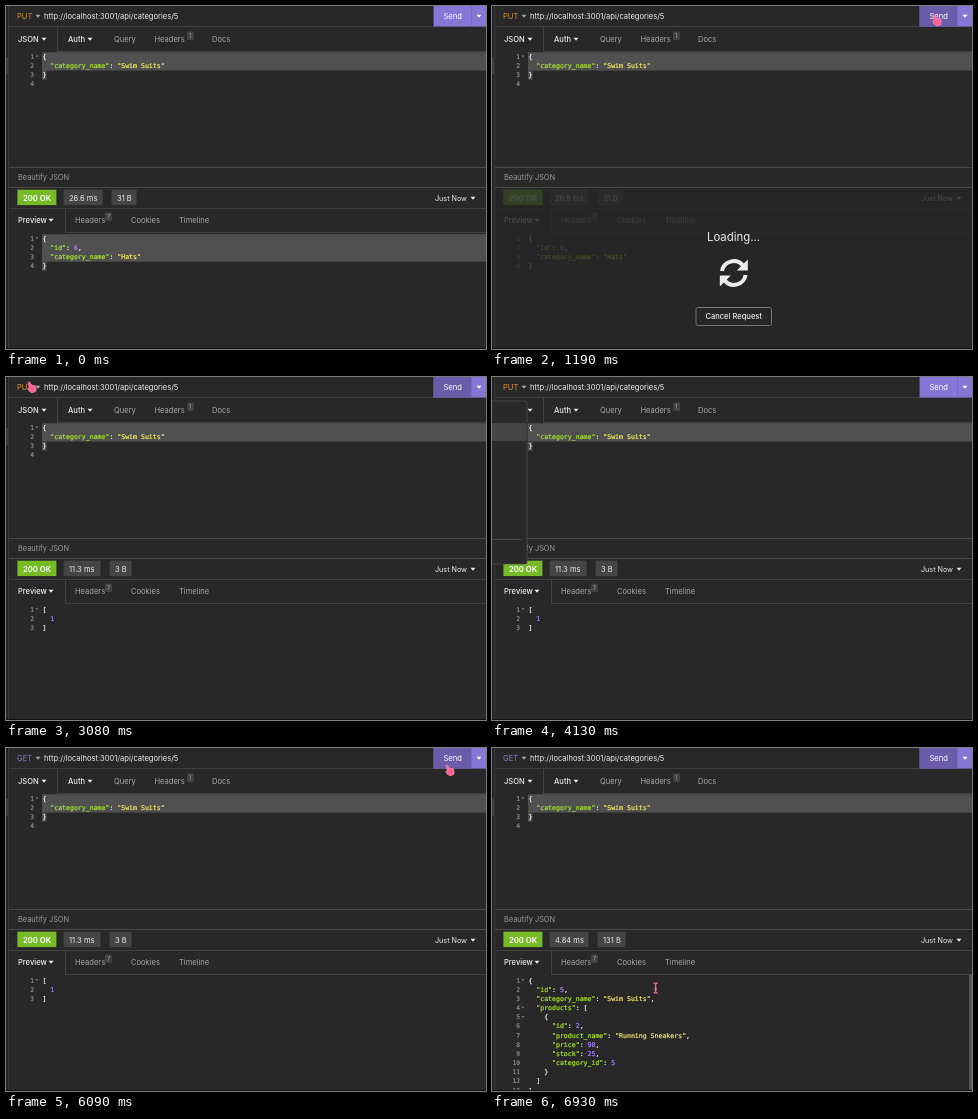
An HTML page for the animation above (7000 ms loop, 480 px wide and 343 px high).

```html
<!DOCTYPE html>
<html lang="en">
<head>
<meta charset="utf-8">
<title>API request demo</title>
<style>
html, body { margin: 0; width: 100%; height: 100%; overflow: hidden; background: #282828; }
svg { display: block; }
text { font: 7.55px Inter, "Open Sans", sans-serif; white-space: pre; }
.code { font: 6.56px "DejaVu Sans Mono", monospace; }
.code, .code tspan { fill: currentColor; stroke: currentColor; stroke-width: .22px; }
.num { font-size: 6.3px; text-anchor: end; }
.mid { text-anchor: middle; }
.active { font-weight: 500; }
</style>
</head>
<body>
<svg id="stage" width="480" height="343" viewBox="0 0 480 343"></svg>
<script>
const LOOP = 7000, STEP = 70, LINE = 9.17;
const WHITE = '#ececec', GREY = '#a6a6a6', EDGE = '#414141', PINK = '#ff6298';

const rect = (x, y, w, h, fill, extra = '') =>
  `<rect x="${x}" y="${y}" width="${w}" height="${h}" fill="${fill}" ${extra}/>`;
// y is the middle of the capitals
const text = (x, y, s, fill = GREY, extra = '') =>
  `<text x="${x}" y="${y + 2.8}" fill="${fill}" ${extra}>${s}</text>`;
const caret = (x, y, fill = WHITE, r = 2.5) =>
  `<path d="M${x - r} ${y - r / 2}h${2 * r}l${-r} ${r * 1.2}z" fill="${fill}"/>`;
const group = (id, body, extra = '') => `<g id="${id}" ${extra}>${body}</g>`;

const paint = line => line.replace(/("[^"]*")(:?)|\d+/g, (all, str, colon) => {
  const color = !str ? '#ae81ff' : colon ? '#a6e22e' : '#f0e866';
  return `<tspan style="color:${color}">${str || all}</tspan>${colon || ''}`;
});

// The selection covers all but the last line, then its brace
function selection(y, rows) {
  const top = y - 3.8, h = rows * LINE;
  return rect(36, top, 444, h, '#505050') + rect(36, top + h, 4.5, LINE, '#505050');
}

function code(src, y, extraLines = 0) {
  const lines = src.split('\n'), count = lines.length + extraLines;
  let out = '';
  for (let i = 0; i < count; i++) {
    const line = lines[i] || '', mid = y + i * LINE;
    out += `<text class="code num" x="28" y="${mid + 2.5}" color="#8c8c8c">${i + 1}</text>`;
    if (/[{[]$/.test(line)) out += caret(31, mid, '#777', 1.6);
    out += `<text class="code" x="36.4" y="${mid + 2.5}" color="#f0f0f0">${paint(line)}</text>`;
  }
  return out;
}

function tabs(y, split, caretX, first, items, badgeX, badge) {
  return rect(split, y - 12, 1, 24, EDGE) + rect(split, y + 12, 480 - split, 1, EDGE) +
    text(12, y, first, WHITE, 'class="active"') + caret(caretX, y) +
    items.map(([x, s]) => text(x, y, s)).join('') +
    rect(badgeX, y - 7.5, 7, 8.5, '#424242', 'rx="1"') +
    text(badgeX + 3.5, y - 4, badge, GREY, 'class="mid" style="font-size:5.6px"');
}

function response(time, timeW, size, sizeW, src) {
  const x = 58 + timeW + 9;
  return rect(57.6, 183.7, timeW, 15.4, '#454545') + text(63, 192, time, WHITE) +
    rect(x - .4, 183.7, sizeW, 15.4, '#454545') + text(x + 5, 192, size, WHITE) +
    code(src, 232);
}

const views = [
  response('26.6 ms', 39, '31 B', 25, '{\n  "id": 6,\n  "category_name": "Hats"\n}'),
  response('11.3 ms', 37, '3 B', 22, '[\n  1\n]'),
  response('4.84 ms', 39, '131 B', 28, `{
  "id": 5,
  "category_name": "Swim Suits",
  "products": [
    {
      "id": 2,
      "product_name": "Running Sneakers",
      "price": 90,
      "stock": 25,
      "category_id": 5
    }
  ]
}`) + rect(477, 226, 3, 116, '#575757', 'rx="1.5"')
];

const arrow = '<path d="M-11.8-2A11.9 11.9 0 0 1 9-7.6" fill="none" stroke="#ececec" stroke-width="4"/>' +
  '<path d="M14-13.6V-2.4H3z" fill="#ececec"/>';

const stage = document.getElementById('stage');
stage.innerHTML =
  rect(0, 0, 480, 343, '#282828') +
  rect(0, 0, 2, 343, '#232323') + rect(0, 51, 2, 17, '#3c3c3c') + rect(2, 0, 1, 343, '#383838') +
  // address bar
  rect(3, 20, 477, 1, EDGE) +
  group('method', '') + caret(32, 10, GREY) +
  text(38, 10, 'http://localhost:3001/api/categories/5', WHITE) +
  rect(427.6, 0, 53, 20.5, '#8676d6') + group('send', rect(427.6, 0, 37.4, 20.5, '#6a5ca8')) +
  rect(465, 0, .7, 20.5, '#7365b8') + text(437.5, 10, 'Send', '#fff') + caret(473, 10, '#fff') +
  // request
  tabs(33, 51, 38, 'JSON', [[108, 'Query'], [148.5, 'Headers'], [206, 'Docs']], 181, 1) +
  text(62, 33, 'Auth', WHITE, 'class="active"') + caret(84, 33) +
  selection(50, 2) + code('{\n  "category_name": "Swim Suits"\n}', 50.3, 1) +
  rect(3, 161, 477, 1, '#4a4a4a') +
  text(12, 171, 'Beautify JSON', '#999', 'style="font-size:7.4px"') +
  rect(3, 181, 477, 1, '#4a4a4a') +
  // response
  rect(11.4, 183.7, 39, 15.4, '#76ba26') +
  text(17, 192, '200 OK', '#fff', 'style="font-size:7.7px;font-weight:600"') +
  text(429, 192, 'Just Now', WHITE, 'style="font-size:7.2px"') + caret(467, 192) +
  rect(3, 202, 477, 1, EDGE) +
  tabs(214, 59, 45, 'Preview', [[69, 'Headers'], [125, 'Cookies'], [173, 'Timeline']], 99, 7) +
  group('picked', selection(232, 3)) +
  views.map((v, i) => group('view' + i, v)).join('') +
  group('loading',
    rect(3, 182, 477, 161, '#252525', 'id="veil"') +
    group('notice',
      text(241.5, 232.2, 'Loading...', WHITE, 'class="mid" style="font-size:11.4px"') +
      group('spin', arrow + `<g transform="rotate(180)">${arrow}</g>`) +
      rect(204, 301.5, 75.5, 18, 'none', 'rx="2" stroke="#777"') +
      text(241.7, 310.5, 'Cancel Request', WHITE, 'class="mid active"'))) +
  rect(0, 342, 480, 1, '#101010') +
  group('menu',
    rect(-5, 24, 40, 163, '#292929', 'stroke="#505050" stroke-width=".8" rx="2"') +
    rect(-5, 0, 39.6, 18, '#454545', 'id="row"') + rect(0, 162, 29, 1, '#4c4c4c')) +
  group('cursor',
    group('hand', `<path d="M-3.8-5.2q1.1-.9 1.9.3l1.3 3 1.3-.5 1 .5 1.2-.1.8.7q1 2.5.1 5.4l-3.9 1.3q-2.8-1-4.2-3.9 0-1.1 1.4-.7z" fill="${PINK}" stroke="#ff9dbf" stroke-width=".5"/>`) +
    group('beam', `<path d="M-2-5Q0-5 0-3.8Q0-5 2-5M0-4V4M-2 5Q0 5 0 3.8Q0 5 2 5M-1.2 1H1.2" fill="none" stroke="${PINK}" stroke-width="1.4"/>`));

const el = id => document.getElementById(id);
const show = (id, on) => el(id).style.display = on ? '' : 'none';
const put = (id, x, y, deg = 0) =>
  el(id).setAttribute('transform', `translate(${x} ${y}) rotate(${deg})`);

// time, x, y of the pointer
const path = [
  [0, 478, -12], [490, 478, -12], [910, 446, 13], [1190, 445, 14.5], [1820, 445, 14.5],
  [2100, 150, 272], [2310, 150, 272], [3010, 26, 10.5], [3500, 26, 10.5], [3780, -12, 73],
  [4060, -12, 73], [4130, -12, 55], [4270, -12, 37], [4550, -12, 37], [5320, 372.5, 8],
  [5530, 372.5, 8], [5950, 444, 21.5], [6090, 444, 22.5], [6440, 444, 22.5],
  [6930, 163.6, 240], [7000, 163.6, 240]
];

function pointer(t) {
  const i = path.findIndex(p => p[0] > t);
  const [t0, x0, y0] = path[i - 1], [t1, x1, y1] = path[i];
  const k = (t - t0) / (t1 - t0), e = k * k * (3 - 2 * k);
  return [x0 + (x1 - x0) * e, y0 + (y1 - y0) * e];
}

// start and end of each request
const waits = [[1050, 1400], [6160, 6370]];

function draw(t) {
  const [x, y] = pointer(t);
  const hand = y < 30 && (x > 428 || x < 36);
  put('cursor', x, y);
  show('hand', hand);
  show('beam', !hand);

  const got = t >= 4620;
  el('method').innerHTML = text(11, 10, got ? 'GET' : 'PUT', got ? '#8278d2' : '#d6913a');
  show('send', t >= 840 && t < 3150 || t >= 5810);

  const view = t < 1400 ? 0 : t < 6370 ? 1 : 2;
  views.forEach((_, i) => show('view' + i, i === view));
  show('picked', t < waits[0][0]);

  const wait = waits.find(([a, b]) => t >= a && t < b);
  show('loading', wait);
  if (wait) {
    const k = Math.min(1, (t - wait[0] + STEP) / 140);
    el('veil').setAttribute('opacity', .81 * k);
    el('notice').setAttribute('opacity', k);
    put('spin', 241.8, 267, (t - wait[0] - 140) * .18);
  }

  show('menu', t >= 3150 && t < 4550);
  const row = Math.floor((y - 28) / 18);
  show('row', x < 35 && row >= 0);
  el('row').setAttribute('y', 28 + row * 18);
}

function tick() {
  draw(Math.floor(performance.now() % LOOP / STEP) * STEP);
  requestAnimationFrame(tick);
}
tick();
</script>
</body>
</html>
```
